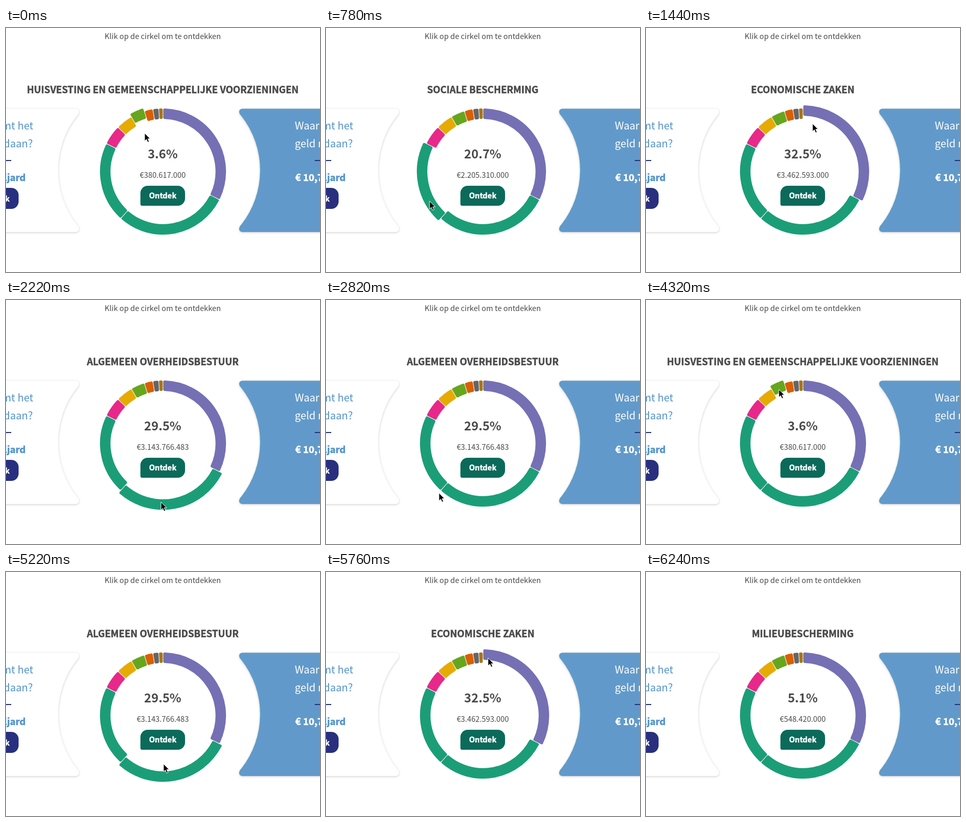
Animation of 598x464 px, one loop 6540 ms. Source, as an HTML page:

```html
<!DOCTYPE html>
<html lang="nl">
<head>
<meta charset="utf-8">
<title>Klik op de cirkel</title>
<style>
html, body { margin: 0; width: 100%; height: 100%; overflow: hidden; background: #fff; }
svg { display: block; font-family: "Noto Sans CJK JP", "Noto Sans CJK SC", "Open Sans", sans-serif; font-size: 14.3px; fill: #4a4a4a; }
.mid { text-anchor: middle; }
.end { text-anchor: end; }
.bold { font-weight: 700; }
.black { font-weight: 700; stroke: #4a4a4a; stroke-width: .5px; }
.white { fill: #fff; }
.white.black { stroke: #fff; }
.blue { fill: #5294ca; }
.blue.black { stroke: #5294ca; }
.navy { fill: #28307f; }
.head { font-size: 18.1px; }
.big { font-size: 23.2px; }
.ask { font-size: 19.7px; }
.card { filter: drop-shadow(0 1px 2px #0003); }
</style>
</head>
<body>
<svg width="598" height="464" viewBox="0 0 598 464">
  <defs>
    <path id="card" d="M640 153.5H452Q444 153.5 444 159Q444 163 448 167A167 167 0 0 1 448 374Q444 378 444 382Q444 388 452 388H640Z"/>
  </defs>

  <text class="mid" x="298.5" y="21">Klik op de cirkel om te ontdekken</text>
  <text class="mid black head" id="title" x="298.5" y="124"></text>

  <g class="card white"><use href="#card" transform="matrix(-1 0 0 1 583 0)"/></g>
  <g class="end">
    <text class="blue ask" x="52" y="193">Waar komt het</text>
    <text class="blue ask" x="51" y="227">geld vandaan?</text>
    <rect class="navy" x="-20" y="251" width="30" height="2"/>
    <text class="blue black head" x="37.5" y="291">€ 10,7 miljard</text>
    <rect class="navy" x="-61" y="304" width="85" height="40" rx="14"/>
    <text class="white black" x="7" y="330">Ontdek</text>
  </g>

  <g class="card" fill="#619aca"><use href="#card"/></g>
  <g class="white">
    <text class="ask" x="550" y="193">Waar gaat het</text>
    <text class="ask" x="550" y="227">geld naartoe?</text>
    <rect class="navy" x="588" y="251" width="30" height="2"/>
    <text class="white black head" x="551" y="291">€ 10,7 miljard</text>
  </g>

  <g id="ring" transform="translate(299 273)" stroke-width="5" stroke-linejoin="round"></g>
  <text class="mid bold big" id="share" x="298.5" y="248"></text>
  <text class="mid" id="amount" x="298.5" y="285"></text>
  <path fill="#0b6a5a" d="M270 300H327A14 14 0 0 1 341 314V324A14 14 0 0 1 327 338H259A3 3 0 0 1 256 335V314A14 14 0 0 1 270 300Z"/>
  <text class="mid white black" x="298.5" y="324">Ontdek</text>

  <path id="cursor" d="M0 0V15L3.5 11.8L6 17.4L8.6 16.3L6.2 10.8H10.8Z" fill="#000" stroke="#fff"/>
</svg>
<script>
const LOOP = 6540, LAST = 6240, STEP = 60;
const CX = 299, CY = 273, INNER = 100, OUTER = 120, GROW = 6;
const $ = id => document.getElementById(id);

// title, share in percent, amount, colour
const slices = [
  ["ECONOMISCHE ZAKEN", 32.5, "3.462.593.000", "#7570b3"],
  ["ALGEMEEN OVERHEIDSBESTUUR", 29.5, "3.143.766.483", "#1b9e77"],
  ["SOCIALE BESCHERMING", 20.7, "2.205.310.000", "#1b9e77"],
  ["MILIEUBESCHERMING", 5.1, "548.420.000", "#e7298a"],
  ["GEZONDHEID", 4.3, "458.750.000", "#e6ab02"],
  ["HUISVESTING EN GEMEENSCHAPPELIJKE VOORZIENINGEN", 3.6, "380.617.000", "#66a61e"],
  ["OPENBARE ORDE EN VEILIGHEID", 2.2, "237.062.000", "#d95f02"],
  ["ONDERWIJS", 1.5, "159.800.000", "#666666"],
  ["RECREATIE, CULTUUR EN GODSDIENST", 1.1, "111.300.000", "#a6761d"]
];

// Pointer around the ring's centre: time, degrees clockwise from the top, radius.
const track = [
  [0, -25.6, 81], [720, -134, 118], [1300, 12, 102], [1440, 11.2, 93],
  [1620, -13, 98], [1680, -13, 108], [1740, -18, 85], [1980, -134, 118],
  [2340, -200, 108], [2820, -138.2, 126], [3120, -55, 110], [3240, -45, 85],
  [3660, -13, 99], [3720, -13, 110], [3780, -6.2, 119.7], [3960, 10, 112],
  [4320, -24.1, 112.8], [4620, -134, 118], [5220, -180.6, 92], [5400, -215, 108],
  [5760, -355, 110], [5940, -372, 92], [6060, -415, 110], [6240, -490, 315]
];

// Inset by half the stroke, so the round joins give rounded corners.
function arc(from, to, grow) {
  const inner = INNER + 2.5 + grow, outer = OUTER - 2.5 + grow;
  const point = (r, a, side) => {
    const b = a + side * 3 / r;
    return `${r * Math.sin(b)} ${-r * Math.cos(b)}`;
  };
  return `M${point(outer, from, 1)}A${outer} ${outer} 0 0 1 ${point(outer, to, -1)}` +
    `L${point(inner, to, -1)}A${inner} ${inner} 0 0 0 ${point(inner, from, 1)}Z`;
}

const total = slices.reduce((sum, s) => sum + s[1], 0);
let angle = 0;
const parts = slices.map(([, share, , colour]) => {
  const path = document.createElementNS("http://www.w3.org/2000/svg", "path");
  path.setAttribute("fill", colour);
  path.setAttribute("stroke", colour);
  $("ring").append(path);
  const from = angle;
  angle += share / total * 2 * Math.PI;
  return { path, from, to: angle };
});

function pointer(t) {
  const i = Math.max(1, track.findIndex(k => k[0] >= t));
  const [t0, a0, r0] = track[i - 1], [t1, a1, r1] = track[i];
  const p = (t - t0) / (t1 - t0);
  const turn = (a0 + (a1 - a0) * p) / 360;
  return { a: (turn - Math.floor(turn)) * 2 * Math.PI, r: r0 + (r1 - r0) * p };
}

// The ring follows the pointer one step late; the hole keeps the last slice raised.
const states = [{ shown: 5, raised: 5 }];
for (let t = 0; t < LAST; t += STEP) {
  const { a, r } = pointer(t);
  const { shown, raised } = states[states.length - 1];
  const hit = parts.findIndex(p => a < p.to);
  states.push(r < INNER ? { shown, raised }
    : r > OUTER + 2 ? { shown, raised: -1 }
    : { shown: hit, raised: hit });
}

function draw(now) {
  const t = Math.min(Math.floor(now % LOOP / STEP) * STEP, LAST);
  const { shown, raised } = states[t / STEP];
  const [title, share, amount] = slices[shown];
  $("title").textContent = title;
  $("share").textContent = share + "%";
  $("amount").textContent = "€" + amount;
  parts.forEach(({ path, from, to }, i) =>
    path.setAttribute("d", arc(from, to, i === raised ? GROW : 0)));
  const { a, r } = pointer(t);
  $("cursor").setAttribute("transform",
    `translate(${CX + r * Math.sin(a)} ${CY - r * Math.cos(a)})`);
}

const start = performance.now();
function tick() {
  draw(performance.now() - start);
  requestAnimationFrame(tick);
}
tick();
</script>
</body>
</html>
```
